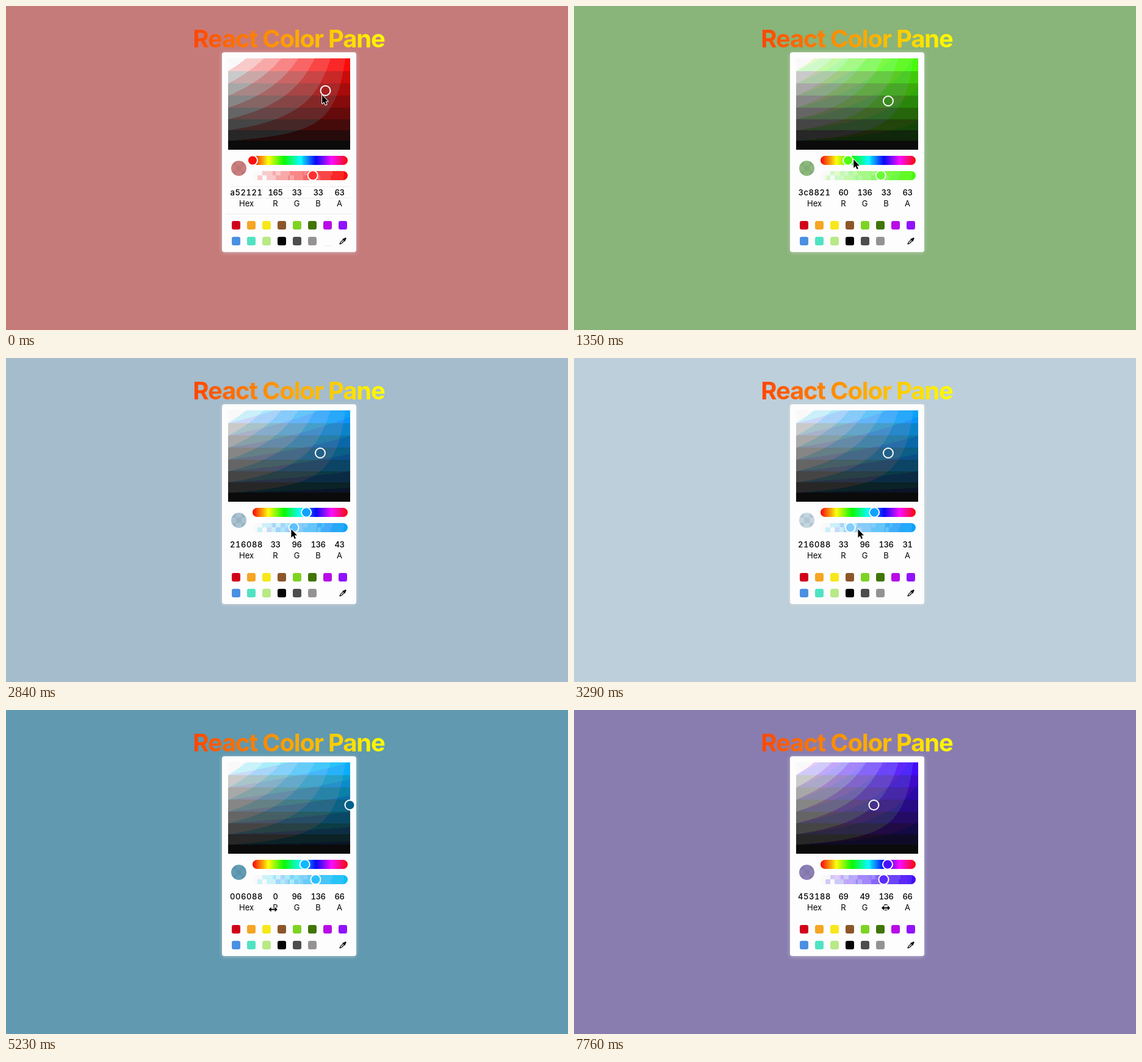
These frames come from a looping animation (921 px wide and 532 px high, 8 s). An HTML page with a canvas:

```html
<!DOCTYPE html>
<html>
<head>
<meta charset="utf-8">
<title>Color Pane</title>
<style>
html, body { margin: 0; width: 921px; height: 532px; overflow: hidden; }
#panel { position: absolute; left: 354px; top: 76px; width: 220px; height: 328px; border-radius: 4px;
  background: #fdfdfd; box-shadow: 0 1px 6px rgba(225, 225, 225, .55); }
canvas, svg { position: absolute; display: block; }
svg { left: 0; top: 0; }
text { font-family: Inter, sans-serif; font-size: 13px; text-anchor: middle; }
#title { font-size: 40px; font-weight: 700; letter-spacing: -1.2px; fill: url(#sun); }
.value { font-weight: 500; font-variant-numeric: tabular-nums; letter-spacing: -.4px; }
#hex { letter-spacing: .6px; }
.knob { stroke: #fdfdfd; stroke-width: 2; }
#lines { stroke: #ececec; }
.cursor { stroke: #fff; stroke-width: 2; stroke-linejoin: round; paint-order: stroke; }
</style>
</head>
<body>
<div id="panel"></div>
<svg id="stage" width="921" height="532">
  <defs>
    <linearGradient id="sun" gradientUnits="userSpaceOnUse" x1="306" x2="622">
      <stop stop-color="#ff4500"/><stop offset="1" stop-color="#ff0"/>
    </linearGradient>
  </defs>
  <text id="title" x="463.5" y="68">React Color Pane</text>
  <path id="lines"/>
  <g id="fields"></g>
  <g id="swatches"></g>
  <g transform="translate(546 380)">
    <path d="M1.2 10.8L2 8.2L6.6 3.6L8.4 5.4L3.8 10Z" fill="none" stroke="#000" stroke-width="1.2"/>
    <path d="M5.4 2.4L6.5 1.4L7.5 2.4L9 .7Q10.2 -.3 11.2 .8T11.3 3L9.6 4.5L10.6 5.5L9.6 6.6Z"/>
  </g>
  <circle class="knob" id="pick" r="8"/>
  <circle class="knob" id="hueKnob" r="8"/>
  <circle class="knob" id="alphaKnob" r="8"/>
  <path class="cursor" id="arrow" d="M1 1V15L4.2 12L6.4 17L8.6 16L6.4 11.2H10.6Z"/>
  <path class="cursor" id="resize" d="M-7 0L-3 -4V-1H3V-4L7 0L3 4V1H-3V4Z"/>
</svg>
<script>
const $ = id => document.getElementById(id);
const stage = $('stage');

// Dragged values: [step, value] key points
const tracks = {
  sat: [[0, .8], [1, .757]],
  val: [[0, .647], [2, .533]],
  hue: [[5.85, 0], [9, 104.3], [13, 203.3]],
  alpha: [[16, 63], [19, 43], [22, 31], [25, 62], [26, 66]],
  red: [[31, 33], [35, 0], [37, 69]],
  green: [[37, 96], [39, 53], [49, 49]]
};
function value(name, n) {
  const keys = tracks[name], i = keys.findIndex(k => k[0] > n);
  if (i === 0) return keys[0][1];
  if (i < 0) return keys[keys.length - 1][1];
  const [[n0, a], [n1, b]] = keys.slice(i - 1, i + 1);
  return a + (b - a) * (n - n0) / (n1 - n0);
}

const pickX = s => 363.5 + 200 * s, pickY = v => 86 + 150 * (1 - v);
const hueX = h => 404 + 156 * h / 360, alphaX = a => 404 + 156 * a;

// The pointer holds one control at a time and glides straight to the next
const grips = [
  { from: 0, to: 2, spot: n => [pickX(value('sat', n)), pickY(value('val', n))] },
  { from: 6, to: 13, spot: n => [hueX(value('hue', n)), 251] },
  { from: 16, to: 26, spot: n => [alphaX(value('alpha', n) / 100), 280] },
  { from: 30, to: 37, spot: n => [429 + value('red', n) / 3, 327.5] },
  { from: 38, to: 49, spot: n => [470 + (value('green', n) - 49) / 3, 332] },
  { from: 51, to: 99, spot: () => [511, 325] }
];
const lead = .75; // knobs trail the pointer
function pointer(n) {
  const i = grips.findIndex(g => n <= g.to), next = grips[i];
  if (n >= next.from) return next.spot(n + lead);
  const prev = grips[i - 1], u = (n - prev.to) / (next.from - prev.to);
  const a = prev.spot(prev.to + lead), b = next.spot(next.from + lead);
  return a.map((v, j) => v + u * (b[j] - v));
}

function toRgb(h, s, v) {
  return [5, 3, 1].map(n => {
    const k = (n + h / 60) % 6;
    return 255 * v * (1 - s * Math.max(0, Math.min(k, 4 - k, 1)));
  });
}
function toHsv([r, g, b]) {
  const max = Math.max(r, g, b), d = max - Math.min(r, g, b);
  const h = max === r ? (g - b) / d : max === g ? 2 + (b - r) / d : 4 + (r - g) / d;
  return [60 * ((h + 6) % 6), d / max, max / 255];
}
const css = c => `rgb(${c.map(Math.round)})`;
const over = (c, a, base) => c.map(v => base + a * (v - base));
const soften = (c, k) => c.map(v => v + k * (Math.max(...c) - v));

// Eight tones per channel give the banded gradients; the middle channel stays half smooth
function tone(v) {
  const k = Math.min(7, Math.floor(8 * (v / 255) ** (1 / 1.12)));
  return k === 7 ? 249 : 255 * ((k + .5) / 8) ** 1.12;
}
function band(c) {
  const min = Math.min(...c), max = Math.max(...c), lo = tone(min), hi = tone(max);
  return c.map(v => (tone(v) + lo + (hi - lo) * (v - min) / (max - min || 1)) / 2);
}

function surface(x, y, w, h, radius) {
  const canvas = document.createElement('canvas');
  canvas.width = w;
  canvas.height = h;
  canvas.style.cssText = `left:${x}px;top:${y}px;border-radius:${radius}px`;
  document.body.insertBefore(canvas, stage);
  const ctx = canvas.getContext('2d'), img = ctx.createImageData(w, h);
  return shade => {
    for (let j = 0, p = 0; j < h; j++)
      for (let i = 0; i < w; i++, p += 4) {
        img.data.set(shade(i + .5, j + .5), p);
        img.data[p + 3] = 255;
      }
    ctx.putImageData(img, 0, 0);
  };
}
const field = surface(364, 86, 200, 150, 0);
const hueBar = surface(404, 246, 156, 15, 7.5);
const alphaBar = surface(404, 271, 156, 15, 7.5);
const preview = surface(369, 253.5, 25, 25, 12.5);
const checker = (x, y, size) => (Math.floor(x / size) + Math.floor(y / size)) & 1 ? 255 : 230;

hueBar(x => band(toRgb(x / 156 * 360, 1, 1)));

let rules = 'M360 341.5H568M521 393.5h12';
$('fields').innerHTML = ['Hex', 'R', 'G', 'B', 'A'].map((label, i) => {
  const x = i ? 406.5 + 35 * i : 394, half = i ? 16.5 : 27;
  for (const y of [296.5, 315.5]) rules += `M${x - half} ${y}h${2 * half}`;
  return `<text class="value" id="${label.toLowerCase()}" x="${x}" y="310.5"></text>
    <text x="${x}" y="328.5">${label}</text>`;
}).join('');
$('lines').setAttribute('d', rules);

$('swatches').innerHTML = ('d0021b f5a623 f8e71c 8b572a 7ed321 417505 b80be6 9013fe ' +
  '4a90e2 50e3c2 b8e986 050505 4e4c4d 969294').split(' ').map((c, i) =>
  `<rect x="${370 + 25 * (i % 8)}" y="${i < 8 ? 353 : 379}" width="14" height="14" rx="3" fill="#${c}"/>`).join('');

function place(id, x, y, fill) {
  $(id).setAttribute('cx', x);
  $(id).setAttribute('cy', y);
  $(id).setAttribute('fill', css(fill));
}

function draw(n) {
  const now = name => value(name, n);
  const rgb = (n < 31 ? toRgb(now('hue'), now('sat'), now('val')) : [now('red'), now('green'), 136]).map(Math.round);
  const [h, s, v] = toHsv(rgb), a = Math.round(now('alpha')) / 100;
  const pure = soften(toRgb(h, 1, 1), .06);
  const back = soften(over(rgb, a, 255), .1);
  document.body.style.background = css(back);

  field((x, y) => band(over(pure, x / 200, 255).map(c => c * (1 - y / 150))));
  alphaBar((x, y) => band(over(pure, x / 156, checker(x - 1, y, 7.5))));
  preview((x, y) => back.map(c => c + (checker(x, y, 25 / 3) - 245) * (1 - a)));

  place('pick', pickX(s), pickY(v), rgb);
  place('hueKnob', hueX(h), 253.5, pure);
  place('alphaKnob', alphaX(a) + .5, 278.3, over(pure, 1 - (1 - a) ** 2, 255));

  $('hex').textContent = rgb.map(c => c.toString(16).padStart(2, '0')).join('');
  ['r', 'g', 'b'].forEach((id, i) => $(id).textContent = rgb[i]);
  $('a').textContent = Math.round(a * 100);
  $('lines').style.display = n < 8 ? '' : 'none';

  const scrubbing = n >= 30;
  $('arrow').style.display = scrubbing ? 'none' : '';
  $('resize').style.display = scrubbing ? '' : 'none';
  $(scrubbing ? 'resize' : 'arrow').setAttribute('transform', `translate(${pointer(n)})`);
}

let last = -1;
const start = performance.now();
function tick() {
  const t = (performance.now() - start) % 8000;
  const n = Math.min(52, Math.floor((t + 8) / 149.2));
  if (n !== last) draw(last = n);
  requestAnimationFrame(tick);
}
tick();
</script>
</body>
</html>
```
